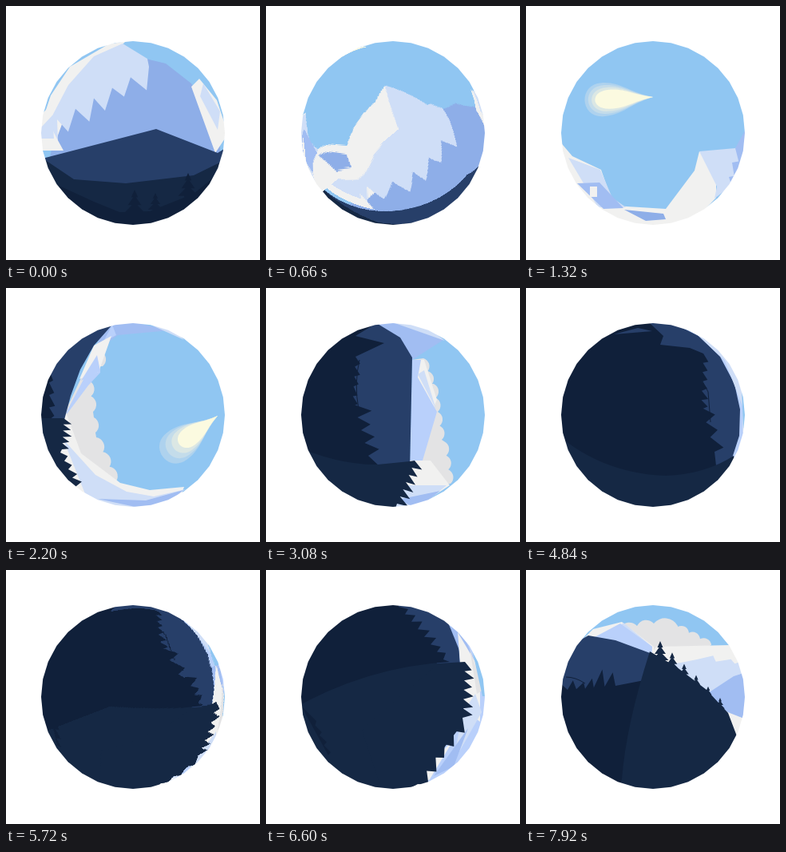
Animation of 318 by 318 pixels, one loop 8 s. Source, as an HTML page with a canvas:

```html
<!DOCTYPE html>
<html lang="en">
<head>
<meta charset="utf-8">
<title>Mountain globe</title>
<style>
html, body { margin: 0; width: 100%; height: 100%; overflow: hidden; background: #fff; }
canvas { display: block; width: 318px; height: 318px; }
</style>
</head>
<body>
<canvas id="globe" width="318" height="318"></canvas>
<script>
const SIZE = 318, MID = 159, RIM = 115, BALL = 116;
const STEP = 110, LOOP = 8000, LAST = 72;

const C = {
  sky: '#90c6f2', white: '#f1f1f0', cloud: '#e3e3e4', ice: '#cfdef7', pale: '#b9d0fb',
  peri: '#8eaee8', lilac: '#a1bdf2', navy: '#273f69', dark: '#152844', night: '#10203a'
};

let seed = 7;
function random() {
  seed = seed * 16807 % 2147483647;
  return seed / 2147483647;
}
const mix = (a, b, t) => a + (b - a) * t;

// Jagged line whose n spikes stand out to the left of the way it runs
function teeth(x0, y0, x1, y1, n, depth) {
  const dx = x1 - x0, dy = y1 - y0, len = Math.hypot(dx, dy);
  let d = '';
  for (let i = 0; i < n; i++) {
    const t = i / n, s = (i + .65 + random() * .25) / n, h = depth * (.6 + random() * .4) / len;
    d += `L${x0 + dx * t} ${y0 + dy * t}L${x0 + dx * s + dy * h} ${y0 + dy * s - dx * h}`;
  }
  return d + `L${x1} ${y1}`;
}

// Row of n cloud bumps, round to the left of the way it runs
function puffs(x0, y0, x1, y1, n) {
  const r = Math.hypot(x1 - x0, y1 - y0) / n * .6;
  let d = `L${x0} ${y0}`;
  for (let i = 1; i <= n; i++) d += `A${r} ${r} 0 0 1 ${mix(x0, x1, i / n)} ${mix(y0, y1, i / n)}`;
  return d;
}

// Fir tree of three tiers with its tip at x, y
function fir(x, y, h) {
  let right = '', left = '';
  for (let i = 1; i <= 3; i++) {
    const w = h * .14 * i, fy = y + h * .32 * i;
    right += `L${x + w} ${fy}L${x + w * .4} ${fy}`;
    left = `L${x - w * .4} ${fy}L${x - w} ${fy}` + left;
  }
  return `M${x} ${y}${right}V${y + h * 1.2}H${x - h * .1}${left}Z`;
}

function firRow(x0, y0, x1, y1, n, h0, h1) {
  let d = '';
  for (let i = 0; i < n; i++) {
    const t = i / (n - 1);
    d += fir(mix(x0, x1, t), mix(y0, y1, t), mix(h0, h1, t));
  }
  return d;
}

// Teardrop sun with its tip at x, y; core and halo are lengths from the tip
function sun(g, x, y, angle, core, halo) {
  g.save();
  g.translate(x, y);
  g.rotate(angle);
  ['#aed2ee', '#c4dcea', '#dbe7e4', '#fbfae0'].forEach((color, i) => {
    const l = mix(halo, core, i / 3), w = 21 - i * 3;
    g.beginPath();
    g.moveTo(0, 0);
    g.bezierCurveTo(l * .35, -w * .35, l * .45, -w, l * .74, -w);
    g.bezierCurveTo(l * 1.08, -w, l * 1.08, w, l * .74, w);
    g.bezierCurveTo(l * .45, w, l * .35, w * .35, 0, 0);
    g.fillStyle = color;
    g.fill();
  });
  g.restore();
}

function branch(g, d) {
  g.strokeStyle = C.night;
  g.stroke(new Path2D(d));
}

function view(base, shapes, extra) {
  const c = document.createElement('canvas');
  c.width = c.height = SIZE;
  const g = c.getContext('2d', { willReadFrequently: true });
  g.fillStyle = C[base];
  g.fillRect(0, 0, SIZE, SIZE);
  for (const [color, d] of shapes) {
    g.fillStyle = C[color];
    g.fill(new Path2D(d));
  }
  if (extra) extra(g);
  return new Uint32Array(g.getImageData(0, 0, SIZE, SIZE).data.buffer);
}

const valley = view('sky', [
  ['peri', 'M55 190L64 140 100 90 150 60 200 72 232 97 268 155V190Z'],
  ['white', 'M30 190L56 112 80 76 128 48 150 44 84 110 62 170Z'],
  ['ice', `M110 63L146 47 177 66${teeth(179, 76, 64, 142, 5, 25)}L65 170 54 145 78 99Z`],
  ['white', 'M40 140L58 122 55 150 72 181H40ZM232 101L242 91 264 118 278 160 262 184Z'],
  ['ice', 'M44 152L58 137 60 166H44ZM247 97L268 132 265 155 243 113Z'],
  ['navy', 'M30 195L188 154 265 184 290 168V290H30Z'],
  ['dark', 'M30 180L85 217 150 222 235 212 290 185V290H30Z'],
  ['night', `M60 222L110 245 142 258 180 257 235 235 290 190V290H60Z${fir(161, 230, 30)}${fir(187, 234, 22)}${fir(228, 209, 30)}`]
]);

const heaven = view('sky', [
  ['white', 'M30 155L58 188 94 205 110 250 175 254 211 206 217 182 238 205 238 240 190 290H110L30 200Z'],
  ['ice', 'M53 190L93 205 108 240 125 252 90 252ZM217 182L262 178 290 150V200L236 241 239 226Z'],
  ['lilac', `M64 222L92 221 122 253 97 254ZM280 145${teeth(262, 178, 250, 232, 3, 9)}L290 195Z`],
  ['white', 'M80 226H89V239H80Z'],
  ['peri', 'M123 255L172 260 175 267 150 269Z']
], g => sun(g, 159, 114, Math.PI - .05, 73, 86));

const clouds = view('sky', [
  ['cloud', `M76 200L74 155${puffs(118, 62, 121, 98, 2)}L112 98${puffs(104, 116, 109, 155, 2)}${puffs(110, 162, 112, 181, 1)}${puffs(113, 187, 138, 242, 3)}Z`],
  ['lilac', 'M125 35L205 53 140 59 112 80Z'],
  ['ice', 'M172 42L205 48 223 65Z'],
  ['pale', 'M133 46L70 166 103 122 118 106 118 70 138 59Z'],
  ['white', 'M132 60L110 72 92 114 116 105Z'],
  ['pale', 'M114 84L118 104 94 116Z'],
  ['white', 'M73 150L94 207 143 244 180 253 223 249 215 270 130 290 60 240Z'],
  ['ice', 'M72 190L112 234 151 255 185 261 225 252 160 290 110 285Z'],
  ['lilac', 'M115 264L175 266 222 253 190 280Z'],
  ['navy', 'M133 46L110 72 93 102 81 135 73 165H30V90L100 30Z'],
  ['night', `M30 85${teeth(54, 103, 54, 165, 4, 8)}H30Z`],
  ['dark', `M30 163${teeth(72, 163, 70, 202, 5, 12)}${teeth(68, 206, 88, 248, 4, 9)}L70 265 30 230Z`]
], g => sun(g, 265, 160, Math.PI - .64, 60, 86));

const ridge = view('sky', [
  ['lilac', 'M130 35L195 40 222 65 183 90Z'],
  ['ice', 'M150 40H190L224 66Z'],
  ['cloud', `M190 215L183 90${puffs(197, 88, 208, 120, 2)}${puffs(210, 120, 220, 190, 4)}${puffs(223, 192, 231, 245, 3)}L205 248Z`],
  ['white', 'M183 90H198L214 140 186 205Z'],
  ['pale', 'M183 90H194L190 112 214 155 196 216 180 222Z'],
  ['ice', 'M190 108L198 103 213 152Z'],
  ['white', 'M180 216H206L230 247 180 280H160Z'],
  ['ice', 'M170 247H226L180 285H150Z'],
  ['lilac', 'M165 265L218 254 190 276Z'],
  ['navy', 'M90 35L140 45 168 62 183 87 180 230H100Z'],
  ['night', `M30 30H130L135 46 112 60 148 69${teeth(112, 86, 108, 148, 5, 9)}${teeth(110, 146, 128, 210, 4, 20)}L143 224H30Z`],
  ['dark', `M30 195Q90 222 140 221L180 217${teeth(186, 216, 164, 270, 6, 16)}L162 276 90 295 30 260Z`]
], g => branch(g, 'M117 90Q110 120 116 152'));

const farSide = view('navy', [
  ['pale', 'M170 30L188 46 216 60 243 86 261 120 268 152 267 185 258 213 290 220V30Z'],
  ['ice', 'M200 45L249 91 271 148 271 180 290 200V30Z'],
  ['sky', 'M270 125L272 175 290 190V110Z'],
  ['night', `M30 30H140L172 60 168 71 205 75${teeth(222, 82, 219, 152, 6, 9)}${teeth(220, 150, 236, 205, 3, 18)}L240 240 30 300Z`],
  ['navy', 'M110 58L140 50 158 54Z'],
  ['dark', 'M30 175Q90 232 175 235 225 233 260 210L290 310H30Z']
], g => branch(g, 'M220 115L228 130 231 168'));

const slope = view('dark', [
  ['navy', 'M150 30L200 45 228 66 250 118H215Z'],
  ['pale', 'M215 40L241 92 248 190 185 272 210 300 300 220V100Z'],
  ['lilac', 'M228 66L250 88 262 115H248Z'],
  ['white', 'M240 78L268 125 268 190 248 175Z'],
  ['cloud', 'M255 98L272 150 264 155Z'],
  ['sky', 'M256 90L271 158H290Z'],
  ['ice', 'M245 180L262 155 270 178 235 240Z'],
  ['lilac', 'M253 198L244 222 235 246 210 258Z'],
  ['white', 'M234 214L205 262 185 278 180 265Z'],
  ['night', `M30 176Q125 121 230 115${teeth(166, 46, 222, 112, 7, 11).split('L').slice(1).reverse().map(p => 'L' + p).join('')}V30H30ZM44 170${teeth(56, 182, 78, 232, 4, 6)}Z`],
  ['dark', `M215 117${teeth(249, 115, 246, 185, 6, 13)}${teeth(246, 185, 190, 268, 5, 13)}L150 290 120 200Z`]
]);

const forest = view('sky', [
  ['cloud', `M120 100${puffs(118, 73, 160, 67, 2)}${puffs(160, 67, 190, 70, 1)}${puffs(190, 71, 232, 94, 3)}L200 110Z`],
  ['white', 'M66 92L84 74 120 65 160 96V112ZM158 104L163 96 256 94 285 135V220L262 206Z'],
  ['ice', 'M70 90L112 75 122 66 158 96 158 106Z'],
  ['pale', 'M84 85L118 67 158 96 157 105Z'],
  ['ice', `M178 118L194 116${teeth(214, 112, 285, 120, 3, 8)}V185L250 180Z`],
  ['lilac', 'M228 154L260 133 285 125V190L254 180Z'],
  ['white', 'M250 177L278 188 270 210Z'],
  ['navy', 'M30 130L55 95 78 82 112 88 158 105 150 155H45Z'],
  ['night', `M30 130${teeth(52, 150, 85, 148, 3, 13)}${teeth(85, 147, 112, 145, 2, 22)}L148 138 150 290H30Z`],
  ['dark', `M155 102L188 121 226 150 253 179 264 208 280 290H110L120 262Q125 195 155 102Z${firRow(168, 89, 243, 160, 6, 25, 14)}`]
], g => branch(g, 'M50 134Q62 134 74 142'));

const views = [valley, heaven, clouds, ridge, farSide, slope, forest];

// Step of each view, and the two points [x, y, x, y] that travel on to the next view
const keys = [0, 12, 20, 28, 44, 60, LAST];
const moves = [
  [[130, 47, 180, 75], [218, 182, 271, 170]],
  [[158, 114, 78, 118], [265, 161, 196, 198]],
  [[122, 170, 128, 70], [235, 203, 200, 90]],
  [[140, 180, 147, 68], [247, 187, 229, 87]],
  [[247, 187, 260, 212], [212, 85, 248, 115]],
  [[248, 115, 150, 125], [157, 103, 126, 212]]
].map(([from, to]) => turn(basis(from), basis(to)));

function unit(v) {
  const n = Math.hypot(...v);
  return v.map(c => c / n);
}
function cross(a, b) {
  return [a[1] * b[2] - a[2] * b[1], a[2] * b[0] - a[0] * b[2], a[0] * b[1] - a[1] * b[0]];
}
function lift(px, py) {
  const x = (px - MID) / BALL, y = (py - MID) / BALL;
  return [x, y, Math.sqrt(Math.max(0, 1 - x * x - y * y))];
}
function basis([x1, y1, x2, y2]) {
  const a = lift(x1, y1), b = lift(x2, y2);
  const e = unit(a.map((c, i) => c + b[i])), n = unit(cross(a, b));
  return [e, n, cross(n, e)];
}

// Axis and angle that carry one basis onto another
function turn(p, q) {
  const m = (r, c) => p.reduce((s, v, i) => s + q[i][r] * v[c], 0);
  const cos = (m(0, 0) + m(1, 1) + m(2, 2) - 1) / 2;
  return {
    axis: unit([m(2, 1) - m(1, 2), m(0, 2) - m(2, 0), m(1, 0) - m(0, 1)]),
    angle: Math.acos(Math.max(-1, Math.min(1, cos)))
  };
}

function matrix([x, y, z], a) {
  const c = Math.cos(a), s = Math.sin(a), k = 1 - c;
  return [
    c + x * x * k, x * y * k - z * s, x * z * k + y * s,
    y * x * k + z * s, c + y * y * k, y * z * k - x * s,
    z * x * k - y * s, z * y * k + x * s, c + z * z * k
  ];
}

const ctx = document.getElementById('globe').getContext('2d');
const sheet = document.createElement('canvas');
sheet.width = sheet.height = SIZE;
const sheetCtx = sheet.getContext('2d');
const image = sheetCtx.createImageData(SIZE, SIZE);
const pixels = new Uint32Array(image.data.buffer);

const rim = new Path2D(), SIDES = 32;
for (let i = 0; i < SIDES; i++) {
  const a = i * 2 * Math.PI / SIDES;
  rim.lineTo(MID + RIM * Math.cos(a), MID + RIM * Math.sin(a));
}
rim.closePath();

// Each pixel is looked up in whichever neighbouring view faces it better
function draw(step) {
  let i = 0;
  while (i < moves.length - 1 && step >= keys[i + 1]) i++;
  const u = (step - keys[i]) / (keys[i + 1] - keys[i]);
  const { axis, angle } = moves[i];
  const A = matrix(axis, -angle * u), B = matrix(axis, angle * (1 - u));
  for (let py = 43; py < 276; py++) {
    for (let px = 43; px < 276; px++) {
      const [x, y, z] = lift(px, py);
      const za = A[6] * x + A[7] * y + A[8] * z;
      const zb = B[6] * x + B[7] * y + B[8] * z;
      const first = za * (1 - u) > zb * u;
      const M = first ? A : B;
      const tx = Math.round(MID + BALL * (M[0] * x + M[1] * y + M[2] * z));
      const ty = Math.round(MID + BALL * (M[3] * x + M[4] * y + M[5] * z));
      pixels[py * SIZE + px] = views[first ? i : i + 1][ty * SIZE + tx];
    }
  }
  sheetCtx.putImageData(image, 0, 0);
  ctx.fillStyle = '#fff';
  ctx.fillRect(0, 0, SIZE, SIZE);
  ctx.save();
  ctx.clip(rim);
  ctx.drawImage(sheet, 0, 0);
  ctx.restore();
}

const start = performance.now();
let shown = -1;
function tick() {
  const t = (performance.now() - start) % LOOP;
  const step = Math.min(LAST, Math.floor(t / STEP));
  if (step !== shown) draw(shown = step);
  requestAnimationFrame(tick);
}
tick();
</script>
</body>
</html>
```
